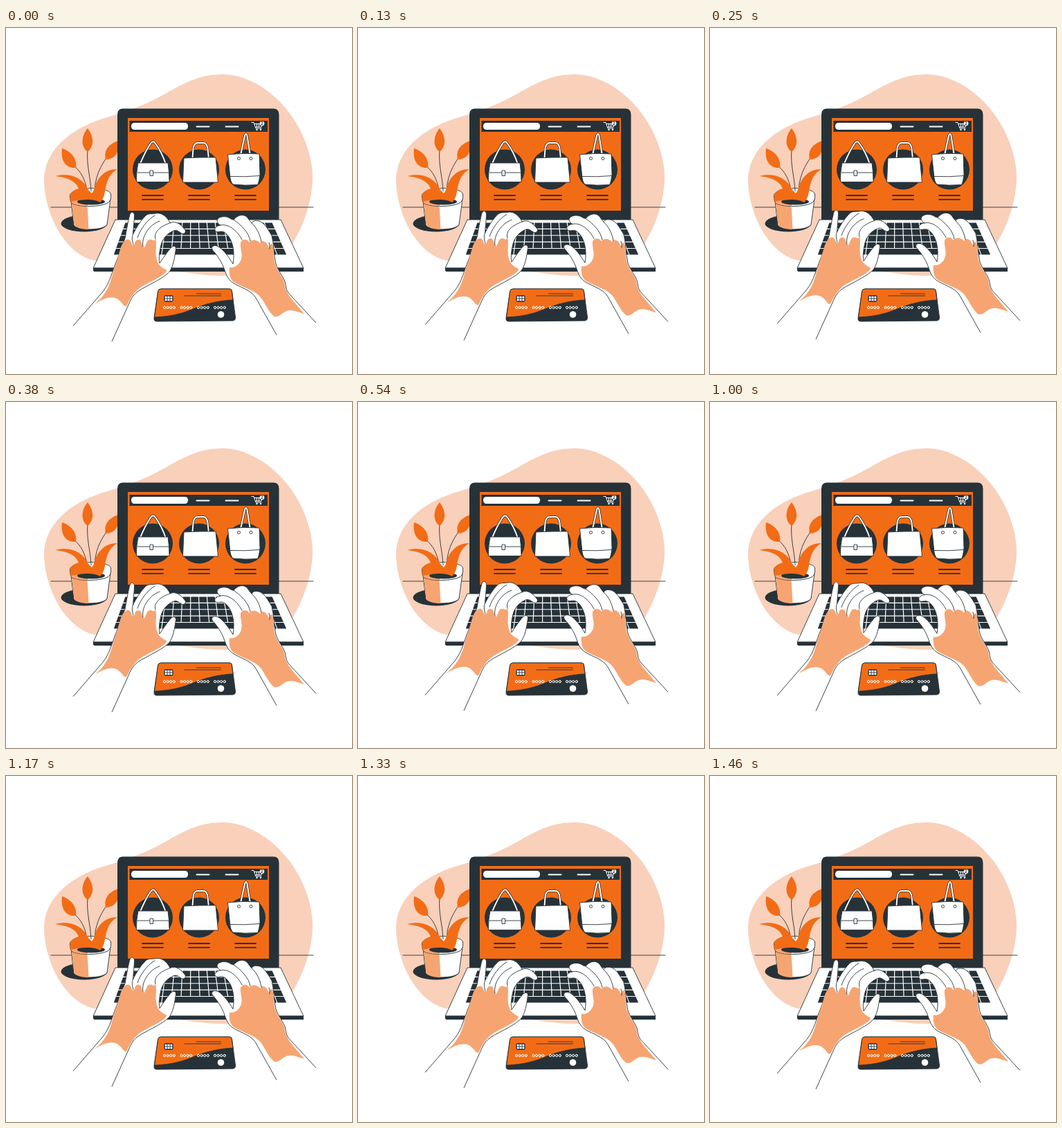
Animation of 500 by 500 pixels, one loop 1500 ms. Source, as an HTML page:

```html
<!DOCTYPE html>
<html lang="en">
<head>
<meta charset="utf-8">
<title>Online shopping</title>
<style>
html, body { margin: 0; width: 100%; height: 100%; overflow: hidden; background: #fff; }
svg { display: block; width: 100%; height: 100%; }
.dark { fill: #263238; }
.orange { fill: #f26c16; }
.skin { fill: #f6a572; }
.white { fill: #fff; }
.line { fill: none; stroke: #263238; stroke-width: .9; stroke-linecap: round; stroke-linejoin: round; }
.ink { stroke: #263238; stroke-width: .9; stroke-linejoin: round; }
.light { fill: none; stroke: #fff; stroke-width: 1; stroke-linecap: round; }
.menu { stroke: #fff; stroke-width: 2; stroke-linecap: round; }
.label { stroke: #263238; stroke-width: 1.8; stroke-linecap: round; }
.strap { fill: none; stroke: #263238; stroke-width: 3.4; }
.strap.inner { stroke: #fff; stroke-width: 1.9; }
</style>
</head>
<body>
<svg viewBox="0 0 500 500">
  <path fill="#f9d0ba" d="M55 222C54 178 92 146 140 131C180 119 202 111 232 94C260 78 282 67 313 67C346 67 380 87 405 117C429 146 443 184 443 216C443 254 426 298 404 326C382 352 350 358 312 358C284 358 262 353 238 351L170 345C150 344 146 338 128 336C90 329 57 276 55 222Z"/>
  <path class="line" d="M65 259H444"/>

  <g id="plant">
    <ellipse class="dark" cx="113" cy="282.5" rx="33.5" ry="12"/>
    <path class="white ink" d="M94 250L98 285C103 293 141 293 146 284L151 247Z"/>
    <path class="skin" d="M94.400 250L98.400 284.500C102 289 110 291 119.500 291L117.500 255Z"/>
    <path class="white ink" d="M92.500 242C93 229 149 228 151.500 240C152 248 150 251 147 253C134 259 108 259 96 254C93 252 92.500 247 92.500 242Z"/>
    <path class="skin" d="M93 242C95 234 110 232 118 232V257.500C106 257 96 255 94.500 252Z"/>
    <ellipse class="dark" cx="123" cy="251" rx="20" ry="4.500"/>
    <path class="line" d="M118 176C116 199 122 213 123 236M99 200C108 207 114 218 117 234M145 188C135 202 129 216 128 236"/>
    <path class="orange" d="M118 145C109 155 107 171 118 179C128 170 127 157 118 145Z"/>
    <path class="orange" d="M81 174C79 189 84 203 101 202C103 189 94 178 81 174Z"/>
    <path class="orange" d="M162 163C147 168 141 178 144 190C154 190 161 183 162 176Z"/>
    <path class="orange" d="M71 214C91 209 110 215 119 234L124 239L127 234C131 217 142 204 161 204C148 211 145 224 143 236C142 244 139 249 136 252C128 247 112 247 94 251C91 244 93 235 105 232C101 222 91 216 71 214Z"/>
  </g>

  <g id="laptop">
    <path class="dark" d="M161 277V125Q161 116.500 169 116.500H386.500Q394.500 116.500 394.500 125V277Z"/>
    <path class="orange" d="M176 130H380V264H176Z"/>
    <path class="dark" d="M178.500 134H378V150H178.500Z"/>
    <rect class="white" x="181" y="137" width="82" height="10" rx="4.500"/>
    <path class="menu" d="M275.500 142.500H293.500M317.500 142.500H335.500"/>
    <path class="light" d="M355 136.500H358L361 145H369M359 138.500H371L369 143H361M362.500 139V143M365.500 139V143"/>
    <circle class="white" cx="362.500" cy="147" r="1.200"/>
    <circle class="white" cx="368" cy="147" r="1.200"/>
    <circle class="white" cx="370" cy="138" r="3.300"/>
    <text class="dark" x="370" y="140.200" font-family="Inter, sans-serif" font-size="6" font-weight="700" text-anchor="middle">2</text>
    <g id="shop"></g>
    <g id="straps"></g>
    <g class="white ink">
      <path d="M191 195H234Q236 208 236 222.500H188.500Q188 208 191 195Z"/>
      <path d="M189.500 209H235.500" fill="none"/>
      <rect x="208" y="206" width="4.500" height="7.500"/>
      <path d="M257 188Q280 186.500 303 187L306.500 223H255.500Z"/>
      <path d="M320.500 183Q343 180 366 182L367 211Q366 222 363.500 226.500Q345 228 328 226Q324 222 323.500 212Z"/>
      <path d="M324 214.500Q345 215.500 366.500 213.500" fill="none"/>
      <circle cx="336.500" cy="188.500" r="2"/>
      <circle cx="354" cy="188.500" r="2"/>
    </g>
    <path class="white ink" d="M158 277H397L430 347H126Z"/>
    <path class="dark" d="M126 346.500H430V352H128Q126 352 126 350Z"/>
    <g id="keys"></g>
  </g>

  <g id="card">
    <path class="dark ink" d="M224 377H323Q326 377 326.500 380L331.500 418Q332 423 327 423L218 424Q213.500 424 214 419L219.500 381Q220 377 224 377Z"/>
    <path class="orange ink" d="M224 377H323Q326 377 326.300 380L328 393C306 394 287 399 268 407C251 414 235 417 214.500 418L219.500 381Q220 377 224 377Z"/>
    <rect class="white ink" x="229" y="387" width="12" height="8" rx="1.500" style="stroke-width:1.300"/>
    <path class="line" d="M229 391H241M233 387V395M237 387V395M275.500 384H310.500M258 387H310.500"/>
    <g id="digits"></g>
    <circle class="white" cx="310.500" cy="414" r="4.800"/>
  </g>

  <g id="hands">
    <path class="white ink" d="M97 430.500L140 381C151 367 153 352 160 336C164 326 167 316 172 304C174 293 176 281 178.500 271C180 264 186 265 185.500 272C185 283 184 290 183.500 298C188 289 194 279 201 272C205 267 213 269 216 268C225 266 233 273 237 281.500C246 278 253 284 259 292C260.500 296 257 298 254 297C249 294 247 291 242 293C231 298 225 306 223 318C221 328 221 334 222 340C226 334 232 325 237 319C241 314 246 314 245.500 320C244 328 243 340 238 349C235 357 215 367 200 375C186 382 182 388 177 400L153 453"/>
    <path class="skin" d="M165 320C168 310 173 304 178 306C182 308 181 314 184 314C187 314 185 307 190 306C197 304 196 316 199 317C202 318 202 307 207 306C211 304 213 310 216 305C219 313 214 325 219 338C222 346 230 348 232 350C232 356 214 364 201 371C187 378 181 388 174 402C169 404 167 392 157 390C146 388 138 393 128 399C144 386 150 373 155 352C158 342 162 331 165 320Z"/>
    <path class="line" d="M183.500 298C181 303 183 309 184 313M190 303C194 291 204 277 215 271M198 316C195 302 207 284 222 279M216 305C213 296 221 287 238 281.500"/>

    <path class="white ink" d="M391 443.500L361 390C356 381 345 377 335 372C324 367 320 362 316 350C312 338 305 328 298.500 321C295 315 302 313 307 316C314 320 322 331 328 341C331 324 328 306 318 297C313 292 309 295 304 294.500C299 291 303 286 310 285C307 284 306 281 305 279C305 273 315 271 322 274C325 276 327 277 329 277C335 270 343 268 349 274C351 277 353 280 355 282C357 278 361 278 366 279C373 281 378 290 384 300C387 312 387 328 390 341C394 353 402 360 404 370C405 378 406 381 412 387L448 426"/>
    <path class="skin" d="M339 310C342 304 349 305 352 310C355 305 362 305 367 311C370 305 377 308 380 318C382 310 385 310 386 317C387 328 387 337 390 344C395 356 402 361 403 372C404 384 418 397 431 413C420 410 414 406 405 409C397 413 395 418 388 417C380 412 376 400 368 389C360 379 340 374 329 367C323 362 322 354 323 346C331 347 337 342 340 334C342 325 338 318 339 310Z"/>
    <path class="line" d="M310 285C322 282 335 294 341 306M329 277C339 284 351 295 353 308M355 282C362 288 367 298 369 309M380 310Q382 314 381 319"/>
  </g>
</svg>
<script>
const PERIOD = 1500, LIFT = 9.6;
const byId = id => document.getElementById(id);
const range = n => [...Array(n).keys()];

byId('shop').innerHTML = [212, 279, 346].map(x =>
  `<circle class="dark" cx="${x}" cy="204.500" r="29"/>` +
  `<path class="label" d="M${x - 15} 242H${x + 15}M${x - 15} 247.800H${x + 15}"/>`).join('');

byId('straps').innerHTML = [
  'M193.500 197C199 184 204 174 209 167Q212.500 161.500 216 167C222 175 227 185 231 197',
  'M269 194L270.500 175Q271.500 166 277 166H285Q290.500 166 291.500 175L293.500 194',
  'M338 188L345 156Q346.700 150 348.500 156L353.500 188'
].map(d => `<path class="strap" d="${d}"/><path class="strap inner" d="${d}"/>`).join('');

byId('digits').innerHTML = [229, 253.500, 278, 302].map(x => range(4).map(i =>
  `<ellipse cx="${x + i * 4.6}" cy="404" rx="1.500" ry="1.800" class="light"/>`).join('')).join('');

// Keyboard columns spread towards the front edge; the last row holds the space bar
function drawKeys() {
  const cols = 18, top = 281, bottom = 328, rows = 5, step = (bottom - top) / rows;
  const edge = (c, y) => {
    const k = (y - top) / (bottom - top), left = 172 - 17 * k, right = 385 + 21 * k;
    return left + (right - left) * c / cols;
  };
  const key = (r, from, to) => {
    const y1 = top + r * step + .5, y2 = y1 + step - 1.1;
    return `M${edge(from, y1) + .6} ${y1}H${edge(to, y1) - .6}L${edge(to, y2) - .6} ${y2}H${edge(from, y2) + .6}Z`;
  };
  let d = key(rows - 1, 5, 13);
  for (const r of range(rows)) {
    for (const c of range(cols)) {
      if (r < rows - 1 || c < 5 || c > 12) d += key(r, c, c + 1);
    }
  }
  byId('keys').innerHTML = `<path class="dark" d="${d}"/>`;
}
drawKeys();

const hands = byId('hands');
function draw(ms) {
  const p = (ms % PERIOD) / PERIOD;
  const rise = LIFT * (1 - Math.abs(1 - 2 * p));
  hands.setAttribute('transform', `translate(0 ${-rise})`);
}

let start;
function tick(now) {
  start ??= now;
  draw(now - start);
  requestAnimationFrame(tick);
}
draw(0);
requestAnimationFrame(tick);
</script>
</body>
</html>
```
